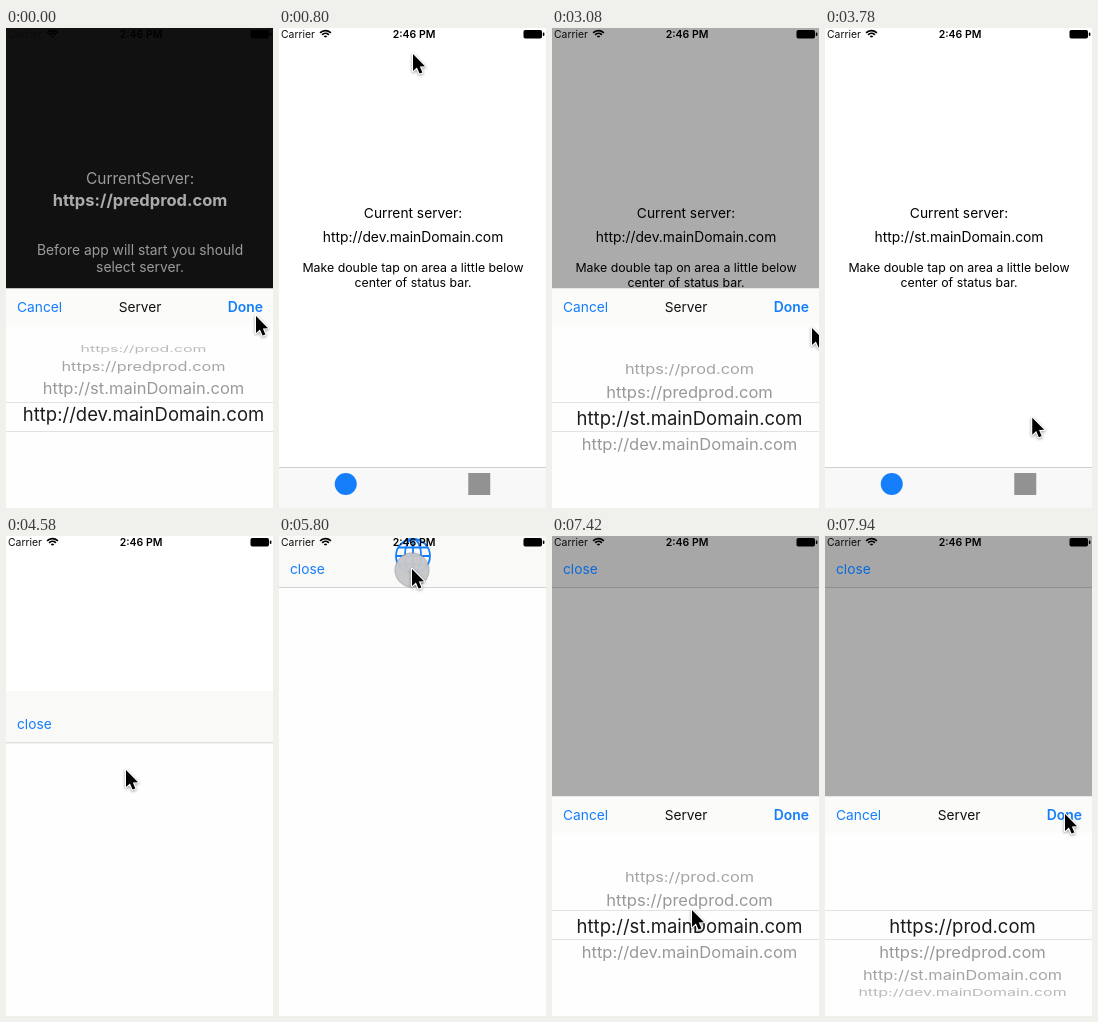
Recreate the animation shown at these times as an HTML page with a canvas. Size 267 by 480 pixels, loop 8 s.

```html
<!DOCTYPE html>
<html lang="en">
<head>
<meta charset="utf-8">
<title>Server picker</title>
<style>
html, body { margin: 0; width: 100%; height: 100%; overflow: hidden; background: #fff; }
canvas { display: block; width: 100%; height: 100%; }
</style>
</head>
<body>
<canvas id="stage"></canvas>
<script>
const W = 267, H = 480, LOOP = 8000;
const SHEET_TOP = 260.5, TAB_TOP = 439;
const FONT = 'Inter, Roboto, sans-serif';
const BLUE = '#147efb';
const SERVERS = [
  'https://prod.com',
  'https://predprod.com',
  'http://st.mainDomain.com',
  'http://dev.mainDomain.com'
];
const canvas = document.getElementById('stage');
const ctx = canvas.getContext('2d');

const point = (x, y) => ({ x, y });
const DONE = point(240, 278), EDGE = point(260, 300), ROW = point(140, 374);
const TOP = point(134, 26), NAV = point(133, 33);
const TAB = point(196, 428), BUTTON = point(120, 234);
const below = (p, dy) => point(p.x + 3, p.y + dy);

const move = (from, to, place) => ({ from, to, place });
const CURSOR_START = point(250, 288);
const MOVES = [
  move(20, 160, DONE),
  move(400, 800, TOP),
  move(2320, 2540, ROW),
  move(2540, 2800, below(ROW, 26)),
  move(2960, 3080, EDGE),
  move(3080, 3180, DONE),
  move(3540, 3900, TAB),
  move(4140, 4400, BUTTON),
  move(4620, 5240, NAV),
  move(7020, 7420, ROW),
  move(7440, 7700, below(ROW, 52)),
  move(7720, 7940, DONE)
];

// A double tap: a short touch, then one held until the sheet opens.
const DOUBLE_TAPS = [
  { first: 840, second: 1060, open: 2140, at: TOP },
  { first: 5340, second: 5720, open: 6780, at: NAV }
];

const clamp = v => Math.min(1, Math.max(0, v));
const within = (t, a, b) => t >= a && t < b;

function ease(t, a, b) {
  const p = clamp((t - a) / (b - a));
  return p * p * (3 - 2 * p);
}

function cursorAt(t) {
  return MOVES.reduce((p, { from, to, place }) => {
    const k = ease(t, from, to);
    return point(p.x + (place.x - p.x) * k, p.y + (place.y - p.y) * k);
  }, CURSOR_START);
}

function sheetShown(t) {
  if (t >= 6780) return 1;
  return t < 2140 ? 1 - ease(t, 180, 440) : 1 - ease(t, 3190, 3340);
}

const wheelPos = t =>
  3.13 - 0.13 * ease(t, 20, 120) - ease(t, 2540, 2820) - 2 * ease(t, 7440, 7880);

const modalTop = t => H * (1 - clamp((t - 4418) / 520)) ** 3;

function text(str, x, y, size, color, align = 'center', weight = 400) {
  ctx.font = `${weight} ${size}px ${FONT}`;
  ctx.textAlign = align;
  ctx.fillStyle = color;
  ctx.fillText(str, x, y + size * 0.36);
}

function rect(x, y, w, h, color) {
  ctx.fillStyle = color;
  ctx.fillRect(x, y, w, h);
}

function disc(x, y, r, color) {
  ctx.beginPath();
  ctx.arc(x, y, r, 0, 2 * Math.PI);
  ctx.fillStyle = color;
  ctx.fill();
}

function clipped(y, h, draw) {
  ctx.save();
  ctx.beginPath();
  ctx.rect(0, y, W, h);
  ctx.clip();
  draw();
  ctx.restore();
}

function tabBar(second) {
  const tint = on => on ? BLUE : '#929292';
  rect(0, TAB_TOP, W, H - TAB_TOP, '#f8f8f8');
  rect(0, TAB_TOP, W, 1, '#d0d0d0');
  disc(W / 4, 456, 11, tint(!second));
  rect(W * 0.75 - 11, 445, 22, 22, tint(second));
}

function mainScreen(server, second) {
  rect(0, 0, W, H, '#fff');
  if (second) {
    text('Show modal view', 134, 228, 12.6, BLUE, 'center', 600);
  } else {
    text('Current server:', 134, 185, 13.75, '#000');
    text(server, 134, 209, 13.85, '#000');
    text('Make double tap on area a little below', 134, 239.5, 12.35, '#000');
    text('center of status bar.', 134, 255, 12.35, '#000');
  }
  tabBar(second);
}

function darkScreen(alpha) {
  ctx.globalAlpha = alpha;
  rect(0, 0, W, H, '#1a1a1a');
  text('CurrentServer:', 134, 150, 15.5, '#e6e6e6');
  text(SERVERS[1], 134, 172.5, 16.5, '#fff', 'center', 700);
  text('Before app will start you should', 134, 222, 13.85, '#e6e6e6');
  text('select server.', 134, 239, 13.85, '#e6e6e6');
  ctx.globalAlpha = 1;
}

function modalScreen(y) {
  rect(0, y, W, H, '#fefefe');
  rect(0, y, W, 51, '#f9f9f8');
  rect(0, y + 51, W, 1, '#d2d2d5');
}

function statusBar() {
  text('Carrier', 2, 6, 10.4, '#111', 'left');
  text('2:46 PM', 135, 6, 10.5, '#000', 'center', 600);
  const left = -Math.PI * 0.76, right = -Math.PI * 0.24;
  ctx.strokeStyle = '#000';
  ctx.lineWidth = 1.7;
  for (const r of [1.6, 4.6, 7.4]) {
    ctx.beginPath();
    ctx.arc(46.5, 10, r, left, right);
    ctx.stroke();
  }
  ctx.fillStyle = '#000';
  ctx.beginPath();
  ctx.roundRect(244.5, 2, 18.5, 8.6, 1.8);
  ctx.roundRect(263.8, 4.6, 1.6, 3.4, 0.7);
  ctx.fill();
}

function globe(x, y, r) {
  ctx.strokeStyle = BLUE;
  ctx.lineWidth = 1.8;
  ctx.beginPath();
  ctx.arc(x, y, r, 0, 7);
  ctx.moveTo(x + r * 0.48, y);
  ctx.ellipse(x, y, r * 0.48, r, 0, 0, 7);
  ctx.moveTo(x, y - r);
  ctx.lineTo(x, y + r);
  for (const k of [-0.5, 0, 0.5]) {
    const half = r * Math.sqrt(1 - k * k);
    ctx.moveTo(x - half, y + k * r);
    ctx.lineTo(x + half, y + k * r);
  }
  ctx.stroke();
}

// Rows lie on a cylinder; the middle band shows them enlarged.
function wheel(pos) {
  const x = 137.5, mid = 390, radius = 81, step = 0.325, top = 374, band = 29;
  const curved = () => SERVERS.forEach((name, i) => {
    const angle = (i - pos) * step, squash = Math.cos(angle);
    ctx.save();
    ctx.translate(x, mid + radius * Math.sin(angle));
    ctx.scale(1 - 0.04 * angle * angle, squash);
    text(name, 0, 0, 16.6, `rgba(0,0,0,${0.42 * squash ** 0.7})`);
    ctx.restore();
  });
  clipped(297, top - 297, curved);
  clipped(top + band, H, curved);
  clipped(top, band, () =>
    SERVERS.forEach((name, i) => text(name, x, mid + (i - pos) * 28, 18.5, '#1c1c1c')));
  rect(0, top, W, 1, '#e2e2e2');
  rect(0, top + band, W, 1, '#e2e2e2');
}

function sheet(shown, pos) {
  ctx.save();
  ctx.translate(0, (1 - shown) * (H - SHEET_TOP));
  rect(0, SHEET_TOP, W, H - SHEET_TOP, '#fefefe');
  rect(0, SHEET_TOP, W, 36.5, '#fbfbfa');
  text('Cancel', 11, 279, 13.75, BLUE, 'left');
  text('Server', 134, 279, 13.7, '#111');
  text('Done', 257, 279, 13.9, BLUE, 'right', 600);
  wheel(pos);
  ctx.restore();
}

function touch({ x, y }) {
  disc(x, y + 1, 17.5, 'rgba(150,150,155,.7)');
  disc(x, y + 1, 16.5, 'rgba(205,205,209,.85)');
}

function cursor({ x, y }) {
  const shape = [[0, 0], [0, 17], [3.9, 13.4], [6.6, 19.6], [9.4, 18.4], [6.8, 12.4], [12, 12.2]];
  ctx.save();
  ctx.beginPath();
  shape.forEach(([dx, dy]) => ctx.lineTo(x + dx, y + dy));
  ctx.closePath();
  ctx.lineJoin = 'round';
  ctx.strokeStyle = '#fff';
  ctx.lineWidth = 2.2;
  ctx.shadowColor = 'rgba(0,0,0,.4)';
  ctx.shadowBlur = 3;
  ctx.shadowOffsetY = 1;
  ctx.stroke();
  ctx.shadowColor = 'transparent';
  ctx.fillStyle = '#000';
  ctx.fill();
  ctx.restore();
}

function draw(t) {
  const shown = sheetShown(t), dark = 1 - ease(t, 460, 640), modalY = modalTop(t);

  mainScreen(SERVERS[t < 3300 ? 3 : 2], t >= 3920);
  if (dark > 0) darkScreen(dark);
  if (modalY < H) modalScreen(modalY);
  if (DOUBLE_TAPS.some(d => within(t, d.first + 60, d.open))) globe(134, 20, 17);
  statusBar();
  rect(0, 0, W, H, `rgba(0,0,0,${0.33 * shown})`);
  if (modalY < H) text('close', 11, modalY + 33, 13.75, shown ? '#0c6ada' : BLUE, 'left');
  if (shown > 0) sheet(shown, wheelPos(t));
  for (const { first, second, open, at } of DOUBLE_TAPS) {
    if (within(t, first, first + 80) || within(t, second, open + 20)) touch(at);
  }
  cursor(cursorAt(t));
}

function resize() {
  const dpr = window.devicePixelRatio || 1;
  canvas.width = Math.round(innerWidth * dpr);
  canvas.height = Math.round(innerHeight * dpr);
}

const start = performance.now();
function frame() {
  ctx.setTransform(canvas.width / W, 0, 0, canvas.height / H, 0, 0);
  draw((performance.now() - start) % LOOP);
  requestAnimationFrame(frame);
}
addEventListener('resize', resize);
resize();
frame();
</script>
</body>
</html>
```
